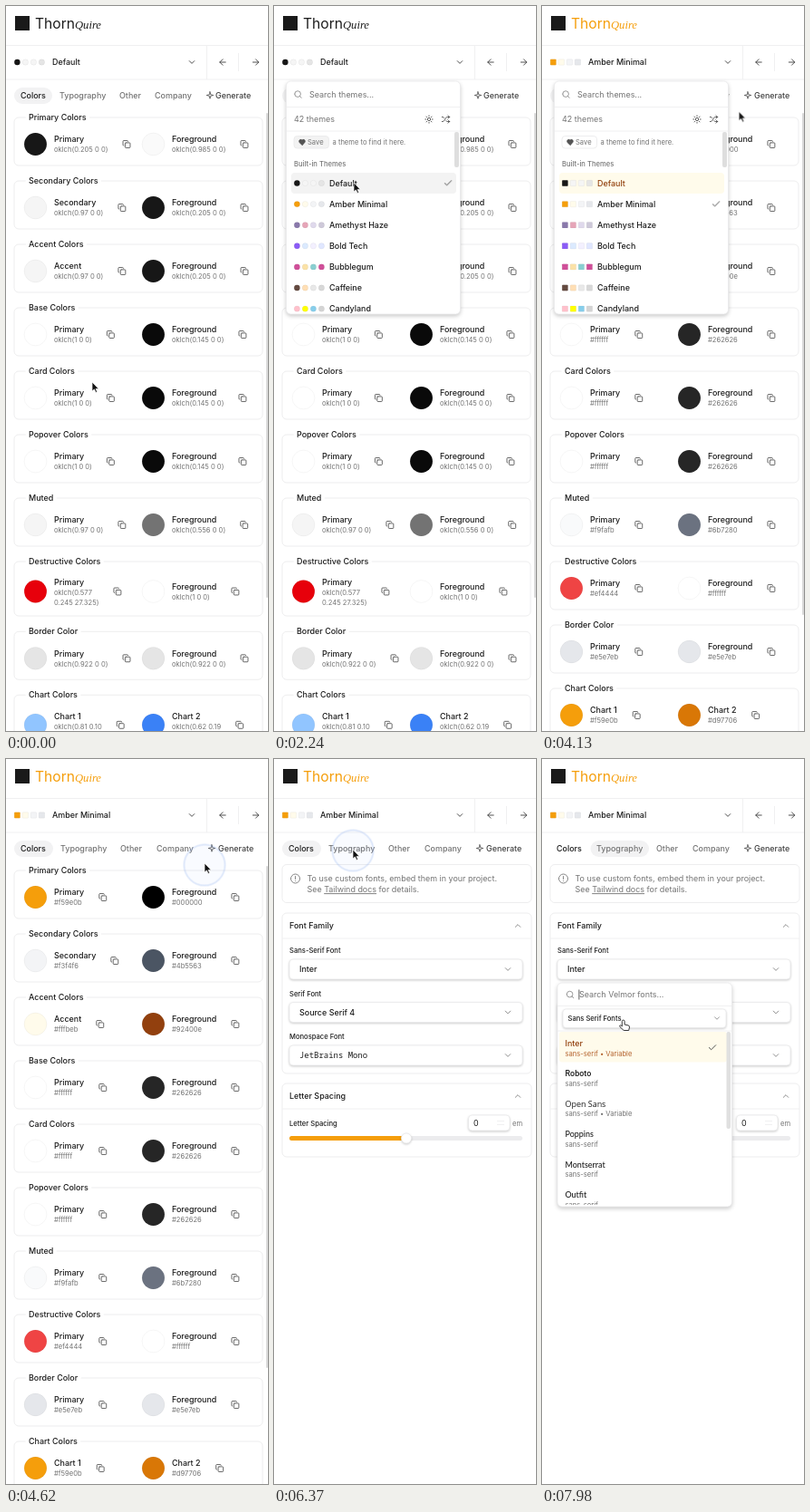
An HTML page for the animation above (8 s loop, 289 by 800 pixels).

```html
<!DOCTYPE html>
<html lang="en">
<head>
<meta charset="utf-8">
<title>Theme editor</title>
<style>
html, body { margin: 0; width: 100%; height: 100%; overflow: hidden; background: #fff; }
svg { display: block; width: 100%; height: 100%; }
text { font: 500 8.95px Inter, sans-serif; fill: #1c1c1c; white-space: pre; }
.soft { fill: #737373; }
.plain { font-weight: 400; }
.small { font-size: 7.6px; }
.sub { font-size: 7.6px; font-weight: 400; fill: #737373; }
.legend { stroke: #fff; stroke-width: 8px; stroke-linejoin: round; paint-order: stroke; }
.brand { font-size: 15.6px; font-weight: 400; }
.script { font: italic 12.6px "Liberation Serif", serif; }
.mono { font-family: "Noto Sans Mono", "DejaVu Sans Mono", monospace; }
.accent text { fill: #92400e; }
.accent .sub { fill: #b4632f; }
.icon { fill: none; stroke: #404040; stroke-width: 2; stroke-linecap: round; stroke-linejoin: round; }
.faint { stroke: #858585; }
.box { fill: #fff; stroke: #e9e9ea; stroke-width: .8; }
.line { stroke: #ededee; stroke-width: .8; }
.raised { filter: drop-shadow(0 1px 1px #0003); }
.floating { filter: drop-shadow(0 2px 2px #0003); }
.dot { stroke: #0001; stroke-width: .6; }
.cursor { animation: travel 8s infinite ease-in-out; }
.ring {
  fill: #6f9cf01c; stroke: #8fb0ef; stroke-width: 1.5; vector-effect: non-scaling-stroke;
  opacity: 0; animation: ring 8s infinite ease-out;
}
@keyframes ring {
  0% { transform: scale(.48); opacity: 1; }
  4% { transform: scale(1); opacity: .35; }
  4.5%, 100% { transform: scale(1); opacity: 0; }
}
@keyframes travel {
  0%, 3% { transform: translate(95px, 415px); }
  14.5%, 18.5% { transform: translate(112px, 52px); }
  27%, 29.5% { transform: translate(88px, 195px); }
  33%, 36% { transform: translate(93px, 219px); }
  41.5%, 44% { transform: translate(130px, 186px); }
  52.5%, 60% { transform: translate(219px, 115px); }
  74.5%, 82% { transform: translate(87px, 100px); }
  88.5%, 93% { transform: translate(90px, 230px); }
  99%, 100% { transform: translate(90px, 288px); }
}
</style>
</head>
<body>
<svg id="stage" viewBox="0 0 289 800" xmlns="http://www.w3.org/2000/svg"></svg>
<style id="windows"></style>
<script>
const LOOP = 8000;
const THEME_AT = 2800, TYPE_AT = 6250, TAB_AT = 6500;
const stage = document.getElementById('stage');
const windows = document.getElementById('windows');

const icons = {
  copy: 'M10 8h10a2 2 0 0 1 2 2v10a2 2 0 0 1-2 2H10a2 2 0 0 1-2-2V10a2 2 0 0 1 2-2M4 16a2 2 0 0 1-2-2V4a2 2 0 0 1 2-2h10a2 2 0 0 1 2 2',
  down: 'm6 9 6 6 6-6',
  up: 'm18 15-6-6-6 6',
  left: 'm12 19-7-7 7-7M19 12H5',
  right: 'M5 12h14M12 5l7 7-7 7',
  search: 'M3 11a8 8 0 1 0 16 0a8 8 0 1 0-16 0m18 10-4.3-4.3',
  check: 'M20 6 9 17l-5-5',
  alert: 'M2 12a10 10 0 1 0 20 0a10 10 0 1 0-20 0M12 7v6m0 4v.1',
  sun: 'M8 12a4 4 0 1 0 8 0a4 4 0 1 0-8 0M12 2v2m0 16v2M2 12h2m16 0h2M5 5l1.4 1.4m11.2 11.2L19 19M5 19l1.4-1.4M17.600 6.400 19 5',
  shuffle: 'm18 14 4 4-4 4m0-20 4 4-4 4M2 18h2a4 4 0 0 0 3.300-1.700l5.400-8.600A4 4 0 0 1 16 6h6M2 6h2a4 4 0 0 1 3.600 2.200M22 18h-6a4 4 0 0 1-3.300-1.800',
  sparkle: 'm12 2 2 8 8 2-8 2-2 8-2-8-8-2 8-2z',
  heart: 'M19 14c1.500-1.500 3-3.200 3-5.500A5.500 5.500 0 0 0 12 5 5.500 5.500 0 0 0 2 8.500C2 10.800 3.500 12.500 5 14l7 7z'
};

const themes = [
  ['Default', '#171717 #f5f5f5 #f5f5f5 #e5e5e5'],
  ['Amber Minimal', '#f59e0b #fffbeb #f3f4f6 #e5e7eb'],
  ['Amethyst Haze', '#8a79ab #e6a5b8 #dfd9ec #cec9d9'],
  ['Bold Tech', '#8b5cf6 #dbeafe #f3f0ff #e0e7ff'],
  ['Bubblegum', '#d04f99 #fbe2a7 #8acfd1 #d04f99'],
  ['Caffeine', '#644a40 #ffdfb5 #e8e8e8 #d8d8d8'],
  ['Candyland', '#ffc0cb #ffff00 #87ceeb #d4d4d4']
];

// Legend, then each swatch: name, colour; "|" marks a line break.
const gray = l => `oklch(${l} 0 0)`;
const neutral = [
  ['Primary Colors', 'Primary', gray(.205), 'Foreground', gray(.985)],
  ['Secondary Colors', 'Secondary', gray(.97), 'Foreground', gray(.205)],
  ['Accent Colors', 'Accent', gray(.97), 'Foreground', gray(.205)],
  ['Base Colors', 'Primary', gray(1), 'Foreground', gray(.145)],
  ['Card Colors', 'Primary', gray(1), 'Foreground', gray(.145)],
  ['Popover Colors', 'Primary', gray(1), 'Foreground', gray(.145)],
  ['Muted', 'Primary', gray(.97), 'Foreground', gray(.556)],
  ['Destructive Colors', 'Primary', 'oklch(0.577|0.245 27.325)', 'Foreground', gray(1)],
  ['Border Color', 'Primary', gray(.922), 'Foreground', gray(.922)],
  ['Chart Colors', 'Chart 1', 'oklch(0.81 0.10|252)', 'Chart 2', 'oklch(0.62 0.19|260)']
];
const amberHex = ['#f59e0b #000000', '#f3f4f6 #4b5563', '#fffbeb #92400e', '#ffffff #262626',
  '#ffffff #262626', '#ffffff #262626', '#f9fafb #6b7280', '#ef4444 #ffffff', '#e5e7eb #e5e7eb', '#f59e0b #d97706'];
const amber = neutral.map(([legend, a, , b], i) => {
  const [first, second] = amberHex[i].split(' ');
  return [legend, a, first, b, second];
});

const text = (x, y, s, cls = '', extra = '') => `<text x="${x}" y="${y}" class="${cls}" ${extra}>${s}</text>`;
const rect = (x, y, x2, y2, cls = '', rx = 0, extra = '') =>
  `<rect x="${x}" y="${y}" width="${x2 - x}" height="${y2 - y}" rx="${rx}" class="${cls}" ${extra}/>`;
const fill = color => `fill="${color}"`;
const line = (x, y, x2, y2 = y) => `<path class="line" d="M${x} ${y}L${x2} ${y2}"/>`;
const icon = (name, x, y, size = 10, cls = '', extra = '') =>
  `<path class="icon ${cls}" ${extra} transform="translate(${x - size / 2} ${y - size / 2}) scale(${size / 24})" d="${icons[name]}"/>`;
const group = (body, extra = '') => `<g ${extra}>${body}</g>`;

let windowCount = 0;
// Shows its content from one time to another in every loop.
function during(from, to, body, fade = 1) {
  const name = 'w' + windowCount++;
  const keys = from ? [[0, 0], [from, 0], [from + fade, 1]] : [[0, 1]];
  keys.push([to, 1]);
  if (to < LOOP) keys.push([to + fade, 0], [LOOP, 0]);
  const css = keys.map(([t, o]) => `${t / LOOP * 100}%{opacity:${o}}`).join('');
  windows.textContent += `@keyframes ${name}{${css}}.${name}{animation:${name} 8s linear infinite}`;
  return group(body, `class="${name}"`);
}

function themeDots(x, y, colors, square) {
  return colors.split(' ').map((c, i) =>
    rect(x + i * 9, y - 3.2, x + i * 9 + 6.4, y + 3.2, 'dot', square ? .6 : 3.2, fill(c))).join('');
}

function header(isAmber) {
  const color = `style="fill:${isAmber ? '#f59e0b' : '#1c1c1c'}"`;
  const [name, colors] = themes[+isAmber];
  return text(32, 25, 'Thorn', 'brand', color) + text(76, 25, 'Quire', 'script', color) +
    themeDots(9.2, 62, colors, isAmber) + text(51, 65.2, name);
}

function tabs(isAmber) {
  const xs = isAmber ? [16, 60, 126, 166] : [16, 59, 125, 164];
  return ['Colors', 'Typography', 'Other', 'Company']
    .map((s, i) => text(xs[i], 102, s, i ? 'soft' : '')).join('') +
    icon('sparkle', isAmber ? 227 : 225, 98.5, 9) + text(isAmber ? 234 : 231, 102, 'Generate', '', 'style="fill:#404040"');
}

function swatch(x, cy, name, value) {
  const lines = value.split('|');
  const top = cy - (lines.length > 1 ? 6.8 : 2.3);
  return group(
    `<circle class="dot" cx="${x}" cy="${cy}" r="12.4" fill="${value.replace('|', ' ')}"/>` +
    text(x + 20.5, top, name) +
    lines.map((s, i) => text(x + 20.5, top + 11.2 + i * 10.3, s, 'sub')).join(''),
    `class="swatch" data-x="${x + 20.5}" data-y="${cy}"`);
}

function palette(rows) {
  let y = 123;
  return rows.map(([legend, a, colorA, b, colorB]) => {
    const tall = colorA.includes('|');
    const cy = y + (tall ? 33 : 29.5);
    const row = rect(9, y, 283, y + (tall ? 60 : 53), 'box', 5) + text(25, y + 3, legend, 'legend') +
      swatch(32.5, cy, a, colorA) + swatch(162.5, cy, b, colorB);
    y += tall ? 77.3 : 70;
    return row;
  }).join('');
}

function themeRow(i, isAmber) {
  const y = 195.5 + i * 23.1;
  return themeDots(22.2, y, themes[i][1], isAmber) + text(61, y + 3.2, themes[i][0]);
}

function themeMenu(isAmber, hovers) {
  const rows = themes.map((_, i) => themeRow(i, isAmber)).join('');
  const marks = hovers.map(([i, from, to]) => {
    const y = 195.5 + i * 23.1;
    return during(from, to, group(
      rect(19, y - 11.5, 201, y + 11.5, '', 4, fill(isAmber ? '#fffbeb' : '#f3f3f3')) + themeRow(i, isAmber),
      isAmber ? 'class="accent"' : ''));
  }).join('');
  return rect(13.5, 83, 205.500, 340, 'box floating', 5) +
    icon('search', 26.5, 97.5, 10, 'faint') + text(39, 100.8, 'Search themes...', 'soft plain') + line(14, 111.5, 205) +
    text(22, 128.2, '42 themes', 'soft plain') + icon('sun', 171, 125) + icon('shuffle', 189.500, 125) + line(14, 138, 205) +
    rect(22, 143.500, 60.5, 157, 'box', 3.5, isAmber ? '' : 'style="fill:#f3f3f3"') +
    icon('heart', 31, 150.5, 8, '', 'style="fill:#555"') + text(37, 153.2, 'Save', 'sub') +
    text(64.5, 153.2, 'a theme to find it here.', 'sub') + text(22, 177.2, 'Built-in Themes', 'small soft') +
    rect(199, 139, 204, 178, '', 2, fill('#dedede')) +
    group(rows + marks + icon('check', 192, 195.5 + isAmber * 23.1, 11), 'clip-path="url(#menuClip)"');
}

function select(y, label, value, cls = '') {
  return text(17, y - 7, label, 'small') + rect(17, y, 274, y + 22, 'box raised', 4) +
    text(28, y + 14.2, value, cls) + icon('down', 258, y + 11, 11, 'faint');
}

function typography() {
  const docsX = 56.5;
  return rect(9, 116.5, 284, 158.5, 'box', 5) + icon('alert', 23.5, 132, 12, 'faint') +
    text(36.5, 135, 'To use custom fonts, embed them in your project.', 'soft plain') +
    text(36.5, 147.2, 'See <tspan text-decoration="underline">Tailwind docs</tspan> for details.', 'soft plain') +
    rect(9, 170, 284, 347, 'box', 5) + text(17, 187.2, 'Font Family') + icon('up', 269, 184, 11, 'faint') + line(9, 198, 284) +
    select(221, 'Sans-Serif Font', 'Inter') + select(268.5, 'Serif Font', 'Source Serif 4') +
    select(316, 'Monospace Font', 'JetBrains Mono', 'mono') +
    rect(9, 358, 284, 439, 'box', 5) + text(17, 375.2, 'Letter Spacing') + icon('up', 269, 372, 11, 'faint') + line(9, 386, 284) +
    text(17, 404.5, 'Letter Spacing', 'small') + rect(214.500, 393, 260, 410, 'box raised', 4) + text(220, 405, '0', 'plain') +
    line(246, 399.5, 254) + line(246, 403.5, 254) + text(263, 404.5, 'em', 'sub') +
    rect(17, 416, 274, 421, '', 2.5, fill('#ececee')) + rect(17, 416, 146, 421, '', 2.5, fill('#f59e0b')) +
    '<circle class="box raised" cx="146" cy="418.5" r="5.5"/>';
}

function fontMenu() {
  const fonts = ['Inter', 'Roboto', 'Open Sans', 'Poppins', 'Montserrat', 'Outfit'];
  const rows = fonts.map((font, i) => {
    const y = 317 + i * 33.4;
    const variable = i === 0 || i === 2 ? ' • Variable' : '';
    return group(text(25.5, y, font, '', `style="font-family:'${font}',Lato,sans-serif"`) +
      text(25.5, y + 10.6, 'sans-serif' + variable, 'sub'), i ? '' : 'class="accent"');
  }).join('');
  return rect(17, 247, 209.5, 494, 'box floating', 5) + icon('search', 31, 260, 10, 'faint') +
    text(41, 263.2, 'Search Velmor fonts...', 'soft plain') +
    during(7350, LOOP, rect(40.5, 254.5, 41.3, 265.5, '', 0, fill('#333'))) + line(17, 272.5, 209) +
    rect(23, 276, 203, 296.500, 'box raised', 3.5) + text(28.5, 288.8, 'Sans Serif Fonts', 'small') +
    icon('down', 193, 286, 10, 'faint') + line(17, 300, 209) +
    group(rect(19, 301, 204, 334.5, '', 3, fill('#fffbeb')) + rows, 'clip-path="url(#fontClip)"') +
    icon('check', 188, 318.5, 11) + rect(203.500, 301, 208, 408, '', 2, fill('#e0e0e0'));
}

const pill = (x, x2) => rect(x, 90, x2, 108, '', 9, fill('#f2f2f3'));
const scrollbar = bottom => rect(287, 118, 289, bottom, '', 1, fill('#d9d9d9'));
const clip = (id, y, y2) => `<clipPath id="${id}">${rect(14, y, 209, y2)}</clipPath>`;
const ring = (time, x, y) =>
  group(`<circle class="ring" r="23" style="animation-delay:${time}ms"/>`, `transform="translate(${x} ${y})"`);
const arrow = '<path d="M0 0V10L2.4 7.9 4 11.4 5.6 10.7 4.1 7.4H7.2Z" fill="#111" stroke="#fff" stroke-width=".7"/>';
const hand = '<path d="M-1.7 1.5a1.4 1.4 0 0 1 2.8 0V5l3.9.9q1.700.4 1.500 2L5.700 11.500H.2L-4 7.600c-1.200-1.300.3-2.300 1.300-1.500l1 .9Z" fill="#fff" stroke="#222" stroke-width=".9" stroke-linejoin="round"/>';

stage.innerHTML =
  `<defs>${clip('menuClip', 182, 339.5)}${clip('fontClip', 300, 492)}</defs>` +
  during(1000, 1450, rect(0, 43.5, 221, 80.5, '', 0, fill('#f2f2f2'))) +
  rect(10, 11, 26, 27, '', 0, fill('#1a1a1a')) +
  line(0, 43.5, 289) + line(0, 81, 289) + line(221.5, 44, 221.5, 81) + line(256.5, 52, 256.5, 72) +
  icon('down', 205, 62, 11) + icon('left', 239, 62, 11) + icon('right', 275.5, 62, 11) +
  during(0, THEME_AT, header(false) + pill(9, 51) + tabs(false) + palette(neutral) + scrollbar(653)) +
  during(THEME_AT, LOOP, header(true)) +
  during(THEME_AT, TAB_AT, pill(9, 52)) + during(TAB_AT, LOOP, pill(53.5, 118)) +
  during(THEME_AT, LOOP, tabs(true)) +
  during(THEME_AT, TYPE_AT, palette(amber) + scrollbar(672)) +
  during(TYPE_AT, LOOP, typography()) +
  during(1400, THEME_AT, themeMenu(false, [[0, 1400, 2480], [1, 2480, THEME_AT]])) +
  during(THEME_AT, 4430, themeMenu(true, [[1, THEME_AT, 3080], [0, 3080, 4500]])) +
  during(7330, LOOP, fontMenu(), 100) +
  ring(1290, 112, 53) + ring(2700, 93, 220) + ring(4350, 219, 117) + ring(6100, 87, 101) + ring(7180, 90, 231) +
  group(during(0, 1030, arrow) + during(1030, 1600, hand) + during(1600, 6950, arrow) + during(6950, LOOP, hand), 'class="cursor"');

// Each copy icon follows the widest line of its label.
for (const item of stage.querySelectorAll('.swatch')) {
  const width = Math.max(...[...item.querySelectorAll('text')].map(t => t.getComputedTextLength()));
  item.insertAdjacentHTML('beforeend', icon('copy', +item.dataset.x + width + 20.5, +item.dataset.y, 9.5));
}
</script>
</body>
</html>
```
